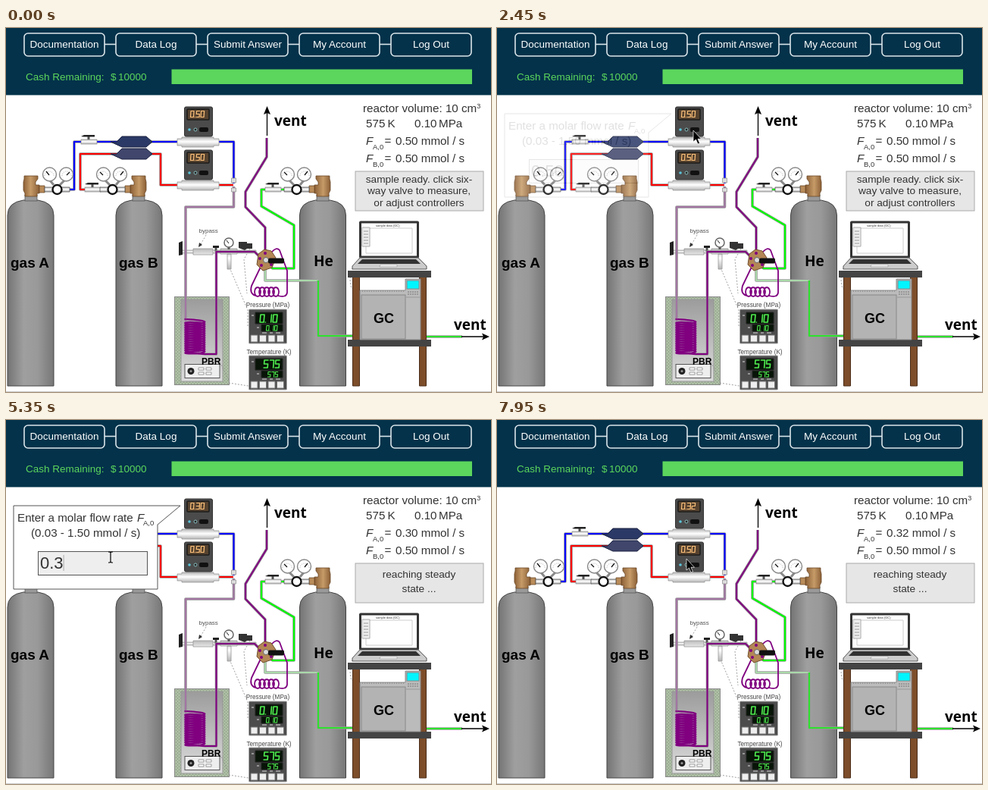
These frames come from a looping animation (640 px wide and 480 px high, 8000 ms). An HTML page:

```html
<!DOCTYPE html>
<html lang="en">
<head>
<meta charset="utf-8">
<title>Reactor lab</title>
<style>
html, body { margin: 0; width: 100%; height: 100%; overflow: hidden; background: #fff; }
svg { display: block; width: 640px; height: 480px; font-family: "Liberation Sans", Arial, sans-serif; }
.menu rect { fill: none; stroke: #dbe5ea; stroke-width: 1.6; }
.menu text { fill: #fff; font-size: 13.5px; text-anchor: middle; }
.cash { fill: #5cd65c; font-size: 13.5px; }
.info, .dialog { fill: #333; font-size: 15.2px; }
.sub { font-size: 9.5px; }
.status { font-size: 13.7px; text-anchor: middle; fill: #333; }
.tank { font-weight: bold; font-size: 19px; }
.label { font: bold 19px "Open Sans", sans-serif; }
.small { font-size: 8.2px; fill: #444; text-anchor: middle; }
.pipe { fill: none; stroke-linejoin: round; }
.seg { fill: none; stroke-linecap: round; }
.wire { fill: none; stroke: #888; stroke-width: .8; stroke-dasharray: 2 2; }
</style>
</head>
<body>
<svg viewBox="0 0 640 480">
<defs>
  <linearGradient id="steel">
    <stop offset="0" stop-color="#747474"/><stop offset=".35" stop-color="#9f9f9f"/>
    <stop offset=".65" stop-color="#999"/><stop offset="1" stop-color="#777"/>
  </linearGradient>
  <linearGradient id="shine" x2="0" y2="1">
    <stop offset="0" stop-color="#bbb"/><stop offset=".45" stop-color="#fff"/><stop offset="1" stop-color="#b5b5b5"/>
  </linearGradient>
  <linearGradient id="brass">
    <stop offset="0" stop-color="#8c6036"/><stop offset=".45" stop-color="#c69b68"/><stop offset="1" stop-color="#8c6036"/>
  </linearGradient>
  <linearGradient id="oven" x2="0" y2="1">
    <stop offset="0" stop-color="#9c9c9c"/><stop offset="1" stop-color="#dcdcdc"/>
  </linearGradient>
  <pattern id="insulation" width="4" height="4" patternUnits="userSpaceOnUse">
    <rect width="4" height="4" fill="#adbea5"/><path d="M0 1h1M2 3h1" stroke="#728b6a"/>
  </pattern>
  <path id="tank" d="M2 472V247Q2 230 23 227H42Q63 230 63 247V472Z" fill="url(#steel)" stroke="#444"/>
  <g id="regulator" stroke="#555" stroke-width=".8">
    <rect x="-8" y="220" width="16" height="8" fill="#999"/>
    <path d="M-9 195H9V199L6 203V207H11V218H8V222H-8V218L-10 214V203L-9 199Z" fill="url(#brass)" stroke="#6b4827"/>
    <path d="M11 208H18V217H11Z" fill="#b98c5a" stroke="#6b4827"/>
    <path d="M18 210H51V216H18Z" fill="url(#shine)"/>
    <path d="M30 207L25 201M38 207L44 201" stroke="#888" stroke-width="3"/>
    <circle cx="34.500" cy="213" r="6" fill="#fff" stroke="#111" stroke-width="2.400"/>
    <g fill="#fff" stroke="#888" stroke-width="1.400"><circle cx="24.500" cy="193" r="9"/><circle cx="46.500" cy="193" r="9"/></g>
    <path d="M18 195A6 6 0 0 1 30 195M41 195A6 6 0 0 1 53 195" fill="none" stroke="#999" stroke-dasharray="1 1.500"/>
    <path d="M24 194L20 189M47 194L51 190" stroke="#111" stroke-width="1.300"/>
  </g>
  <g id="valve">
    <rect x="-10" y="-3" width="21" height="6" fill="url(#shine)" stroke="#888" stroke-width=".7"/>
    <path d="M0 -3V-7" stroke="#555" stroke-width="3"/><path d="M-10 -7L-6 -9H8V-6.500H-6Z" fill="#222"/>
  </g>
  <g id="controller">
    <path d="M226 146H232V144H274V146H281V155H274V157H232V155H226Z" fill="url(#shine)" stroke="#999" stroke-width=".8"/>
    <rect x="235.500" y="104" width="37" height="39" rx="2" fill="#4b4b4b" stroke="#333"/>
    <rect x="239" y="107" width="29" height="14" rx="1" fill="#57432f" stroke="#1b1b1b" stroke-width="1.500"/>
    <circle cx="242" cy="134" r="1.800" fill="#5bc4da"/><circle cx="250" cy="134" r="2" fill="#222" stroke="#8bb"/>
    <rect x="255" y="131" width="12" height="6" rx="2" fill="#111"/>
  </g>
  <g id="meter">
    <rect x="320.500" y="371" width="50" height="45" rx="1" fill="#4c4c4c" stroke="#aaa"/>
    <path d="M329 375H365V390H329ZM337 391H365V400H337Z" fill="#071407" stroke="#222"/>
    <path d="M324 379h3M331 395h3M338 402h6M348 402h4M356 402h6" stroke="#ddd"/>
    <path d="M323 405H332V414H323ZM334.500 405H343.500V414H334.500ZM346 405H355V414H346ZM357.500 405H366.500V414H357.500Z" fill="#eee" stroke="#777"/>
  </g>
</defs>

<rect width="640" height="480" fill="#fff"/>
<rect width="640" height="88.500" fill="#03324a"/>
<path d="M0 479.500H640" stroke="#ccc"/>
<g class="menu" id="menu"></g>
<text class="cash" x="26" y="69">Cash Remaining:</text><text class="cash" x="138" y="69">$</text><text class="cash" x="148" y="69">10000</text>
<rect x="218.500" y="54.500" width="396.500" height="19.500" fill="#5cd65c"/>

<g class="info">
  <text x="471" y="111">reactor volume: 10 cm<tspan font-size="9" dy="-5">3</tspan></text>
  <text x="475" y="131">575</text><text x="503.500" y="131">K</text>
  <text x="539" y="131">0.10</text><text x="571" y="131">MPa</text>
  <text x="475" y="153.500" font-style="italic">F</text><text class="sub" x="484" y="159.500">A,0</text><text x="499.500" y="153.500">=</text>
  <text x="514" y="153.500"><tspan id="flowA"></tspan> mmol / s</text>
  <text x="475" y="177" font-style="italic">F</text><text class="sub" x="484" y="183">B,0</text><text x="499.500" y="177">=</text>
  <text x="514" y="177">0.50 mmol / s</text>
</g>
<rect x="461" y="189" width="169" height="52" fill="#e6e6e6" stroke="#aaa"/>
<g class="status" id="ready"><text x="545" y="203.500">sample ready. click six-</text><text x="545" y="219">way valve to measure,</text><text x="545" y="234.500">or adjust controllers</text></g>
<g class="status" id="reaching"><text x="545" y="208">reaching steady</text><text x="545" y="227">state ...</text></g>

<!-- reactor -->
<rect x="222.500" y="354.500" width="72" height="116" fill="url(#insulation)" stroke="#888"/>
<rect x="231" y="358" width="55" height="108" fill="url(#oven)" stroke="#999"/>
<rect x="236" y="443.500" width="46" height="18" fill="#eee" stroke="#555"/>
<circle cx="244" cy="452.500" r="4.500" fill="#222"/><circle cx="244" cy="452.500" r="1.500" fill="#999"/>
<path d="M254 448h7v3h-7zM264 448h7v3h-7zM254 454h7v3h-7zM264 454h7v3h-7z" fill="#fff" stroke="#777" stroke-width=".7"/>

<!-- bypass and gauges -->
<path class="wire" d="M295 316L319 372V394M322 291L314 305L318 350M294 468L320 472M277 430L295 466"/>
<path d="M230 293H330V297H230Z" fill="url(#shine)" stroke="#999" stroke-width=".7"/>
<path d="M247 291H273V299H247ZM283 291H305V298H283ZM292 298H297V318H292Z" fill="url(#shine)" stroke="#999" stroke-width=".8"/>
<path d="M294 289V292M277 289V295" stroke="#555" stroke-width="3"/>
<path d="M228 283L233 281V299L228 300ZM273 287H281V290H273Z" fill="#222"/>
<circle cx="294" cy="283" r="6" fill="#fff" stroke="#666" stroke-width="1.500"/><path d="M294 284L291 280" stroke="#111"/>
<path d="M307 282H318V284H325V291H318L315 293L307 290Z" fill="#333"/>
<text x="254.500" y="270" font-size="8" fill="#555">bypass</text><path class="wire" d="M264 273L257 285"/><path d="M254 289L255 283L259 286Z" fill="#333"/>

<use href="#tank"/><use href="#tank" x="143"/><use href="#tank" x="385.500"/>
<g class="tank"><text x="6" y="315.500">gas A</text><text x="149" y="315.500">gas B</text></g>
<text class="label" x="406" y="314">He</text>

<g id="pipes"></g>
<path class="pipe" id="coil" stroke="#800080" stroke-width="2.300"/>
<path class="pipe" id="loop" stroke="#800080" stroke-width="1.800"/>
<text x="258" y="443.500" font-size="12" font-weight="bold">PBR</text>

<!-- six-way valve -->
<path d="M333 298L341 292L350 294L356 303L351 316L339 320L331 312Z" fill="#b38655" stroke="#70502f"/>
<g fill="#800080"><circle cx="342" cy="297" r="2"/><circle cx="335" cy="304" r="2"/><circle cx="337" cy="313" r="2"/><circle cx="350" cy="312" r="2"/></g>
<circle cx="343" cy="306" r="3.500" fill="#ddd" stroke="#666"/><rect x="346" y="303.500" width="21" height="7" rx="2" fill="#111"/>

<path d="M138 150H146L153 143H185L193 150L185 157H153Z" fill="#2b3966" stroke="#1a2140"/>
<path d="M138 166H146L153 159H185L193 166L185 173H153Z" fill="#40466c" stroke="#1a2140"/>
<use href="#valve" x="109" y="150"/><use href="#valve" x="114" y="213"/><use href="#valve" x="352" y="213"/>
<g fill="#ddd" stroke="#888" stroke-width=".7"><path d="M297.500 198h6v6h-6zM297.500 211h6v5h-6z"/></g>
<use href="#regulator" x="33"/>
<use href="#regulator" transform="translate(175) scale(-1 1)"/>
<use href="#regulator" transform="translate(418) scale(-1 1)"/>
<use href="#controller"/><use href="#controller" y="57"/>
<g class="seg" stroke="#ffc27a" stroke-width="1.200">
  <g id="displayA" transform="translate(244 109.500) skewX(-4)"></g>
  <g id="displayB" transform="translate(244 166.500) skewX(-4)"></g>
</g>
<use href="#meter"/><use href="#meter" y="61"/>
<g class="seg" id="meters" stroke="#50ee50" stroke-width="1.300"></g>
<text class="small" x="345.500" y="368">Pressure (MPa)</text><text class="small" x="347" y="429.500">Temperature (K)</text>

<path d="M344.500 112V142M601 407H630" stroke="#000" stroke-width="1.300"/>
<path d="M344.500 103L349 114L344.500 112L340 114ZM638 407L628 402.500L630 407L628 411.500Z"/>
<text class="label" x="354" y="129">vent</text><text class="label" x="591" y="398">vent</text>

<!-- analysis bench -->
<path class="wire" d="M459 313Q452 325 455 340Q458 348 468 348"/>
<path d="M457.500 328H466.500V472H457.500ZM545.500 328H554.500V472H545.500Z" fill="#7d4d2a" stroke="#4a2c18"/>
<path d="M451 320H561V329H451ZM451 411H561V420H451Z" fill="#444"/>
<path d="M467 346H527V331H547V411H467Z" fill="#bbb" stroke="#888"/>
<rect x="469" y="352" width="58" height="58" fill="#b3b3b3" stroke="#888"/>
<path d="M470 347H525" stroke="#777" stroke-dasharray="1 2"/>
<rect x="529" y="333" width="16" height="11" fill="#00f5ff" stroke="#888"/>
<path d="M530 348H545M530 351H545" stroke="#777" stroke-dasharray="2 1"/><path d="M528 355H547" stroke="#999"/>
<text x="485" y="388.500" font-size="18" font-weight="bold">GC</text>
<rect x="466" y="254.500" width="79" height="49" rx="2" fill="#333"/>
<rect x="469" y="257.500" width="73" height="43" fill="#fff"/>
<path d="M475 264H536V297H475Z" fill="#fff" stroke="#ccc"/>
<path d="M470 263h10v25h-10z" fill="#eee" stroke="#aaa"/><path d="M472 268h6M472 272h6M472 276h6M472 280h6M472 284h6" stroke="#999"/>
<text x="488" y="262" font-size="4" fill="#333">sample data (GC)</text>
<path d="M467 303H544L555 314V318H457V314Z" fill="#ccc" stroke="#555"/>
<path d="M470 305H541L547 311H464Z" fill="#333"/><path d="M494 312H516V315H493Z" fill="#eee" stroke="#999" stroke-width=".6"/>

<g class="dialog" id="dialog">
  <path d="M10 113H230L200 138V223H10Z" fill="#fff" stroke="#555"/>
  <text x="15" y="133.500">Enter a molar flow rate</text><text x="173" y="133.500" font-style="italic">F</text><text class="sub" x="181" y="138.500">A,0</text>
  <text x="33" y="154">(0.03 - 1.50 mmol / s)</text>
  <rect x="42.500" y="173.500" width="144" height="31" fill="#eee" stroke="#555"/>
  <rect id="selection" x="44" y="177" width="44" height="23" fill="#3394fa"/>
  <text id="entry" x="45" y="196" font-size="22"></text>
  <path id="caret" d="M0 178V199" stroke="#aaa"/>
</g>
<g id="tooltip">
  <rect x="285" y="104" width="197" height="54" rx="4" fill="#333" opacity=".8"/>
  <g font-size="11" fill="#fff"><text x="291" y="119">Mass flow controller for component A.</text><text x="291" y="135">Left-click to adjust molar flow rate.</text><text x="291" y="150">Right-click for more information.</text></g>
</g>
<g id="cursor">
  <path id="arrow" d="M0 0V15L3.500 12L6 18L8.500 17L6 11.300H10.500Z" fill="#000" stroke="#fff" stroke-width=".7"/>
  <path id="beam" d="M-3 -7H-1L0 -6L1 -7H3M0 -6V6M-3 7H-1L0 6L1 7H3" fill="none" stroke="#000" stroke-width="1.200"/>
</g>
</svg>
<script>
const $ = id => document.getElementById(id);
const clamp = u => Math.min(1, Math.max(0, u));
const progress = (t, from, to) => clamp((t - from) / (to - from));
const easeInOut = u => u < .5 ? 4 * u ** 3 : 1 - 4 * (1 - u) ** 3;
const easeOut = u => 1 - (1 - u) ** 2;
const show = (id, on) => $(id).style.display = on ? '' : 'none';

$('menu').innerHTML = ['Documentation', 'Data Log', 'Submit Answer', 'My Account', 'Log Out'].map((name, i) => {
  const x = 24 + i * 121;
  return `<rect x="${x}" y="7" width="106" height="30" rx="5"/><text x="${x + 53}" y="26">${name}</text>` +
    (i < 4 ? `<path d="M${x + 106} 21.5h15" stroke="#dbe5ea" stroke-width="1.6"/>` : '');
}).join('');

const pipes = [
  ['blue', 'M83 213H90V150H300.500V205'],
  ['red', 'M132 213H98V166H204V207H300'],
  ['#a276a2', 'M300.500 209V236H237V386'],
  ['#800080', 'M262 430H277.500V295H328L335 302'],
  ['#800080', 'M344 145V170L316 216V236L342 263V294'],
  ['#0f0', 'M368 213H337V235L380 260V317H352L347 314'],
  ['#a9d9a9', 'M342 319V333H412'],
  ['#2de32d', 'M412 333V406H467'],
  ['#2de32d', 'M547 407H602']
];
$('pipes').innerHTML = pipes.map(([color, d]) =>
  `<path class="pipe" d="${d}" stroke="#999" stroke-width="3.6"/><path class="pipe" d="${d}" stroke="${color}" stroke-width="2.1"/>`).join('');

let coil = 'M237 384';
for (let y = 388; y < 428; y += 3) coil += `C232 ${y - 4} 266 ${y - 3} 262 ${y}S232 ${y + 3} 237 ${y + 1}`;
$('coil').setAttribute('d', coil + 'L262 430');

let loop = 'M350 296Q357 288 361 293L371 320V349Q370 356 359 353';
for (let x = 356; x > 328; x -= 6) loop += `M${x} 342a4 6 0 1 0 .1 0`;
$('loop').setAttribute('d', loop + 'M329 353Q321 350 324 340L337 313');

const segments = { a: 'M0 0H4', b: 'M4 0V4', c: 'M4 4V8', d: 'M0 8H4', e: 'M0 4V8', f: 'M0 0V4', g: 'M0 4H4' };
const lit = { 0: 'abcdef', 1: 'bc', 2: 'abged', 3: 'abgcd', 5: 'afgcd', 7: 'abc' };
function digits(text) {
  let x = 0;
  return [...text].map(ch => {
    const d = ch === '.' ? 'M-.3 8h.1' : [...lit[ch]].map(s => segments[s]).join('');
    const path = `<path d="${d}" transform="translate(${x})"/>`;
    x += ch === '.' ? 1.6 : 6;
    return path;
  }).join('');
}
$('displayB').innerHTML = digits('0.50');
$('meters').innerHTML = [['0.10', 336, 378, 1.25], ['0.10', 344, 392.5, .8], ['575', 341, 438, 1.25], ['575', 346, 453.5, .8]]
  .map(([text, x, y, s]) => `<g transform="translate(${x} ${y}) scale(${s}) skewX(-5)">${digits(text)}</g>`).join('');

const flowSteps = [[0, '0.50'], [4600, '0.03'], [5350, '0.30'], [5780, '0.32']];
const entrySteps = [[0, '0.50'], [4600, '0'], [4970, '0.'], [5350, '0.3'], [5780, '0.32']];
const stepAt = (steps, t) => steps.filter(([start]) => t >= start).pop()[1];

const moves = [
  [110, 1190, 523, 462, 259, 135],
  [2740, 3160, 259, 135, 138, 181],
  [7220, 7950, 138, 181, 250, 183]
];

let shownFlow;
function draw(now) {
  const t = now % 8000;
  const flow = stepAt(flowSteps, t);
  if (flow !== shownFlow) {
    shownFlow = flow;
    $('flowA').textContent = flow;
    $('displayA').innerHTML = digits(flow);
  }
  show('ready', t < 4600);
  show('reaching', t >= 4600);

  const fade = progress(t, 2390, 2820) * (1 - progress(t, 6300, 6700));
  show('dialog', fade > 0);
  $('dialog').style.opacity = fade;
  $('entry').textContent = stepAt(entrySteps, t);
  const selected = t >= 3410 && t < 4600;
  $('entry').style.fill = selected ? '#fff' : '#333';
  show('selection', selected);
  show('caret', t >= 4600);
  if (fade > 0) $('caret').setAttribute('transform', `translate(${45.5 + $('entry').getComputedTextLength()})`);

  show('tooltip', t >= 1770 && t < 2390);
  $('tooltip').style.opacity = easeOut(progress(t, 1770, 2140));

  const [from, to, x0, y0, x1, y1] = moves.filter(m => t >= m[0]).pop() || moves[0];
  const u = easeInOut(progress(t, from, to));
  $('cursor').setAttribute('transform', `translate(${x0 + (x1 - x0) * u} ${y0 + (y1 - y0) * u})`);
  const typing = t >= 3110 && t < 7220;
  show('cursor', t >= 110);
  show('beam', typing);
  show('arrow', !typing);
  requestAnimationFrame(draw);
}
draw(performance.now());
</script>
</body>
</html>
```
